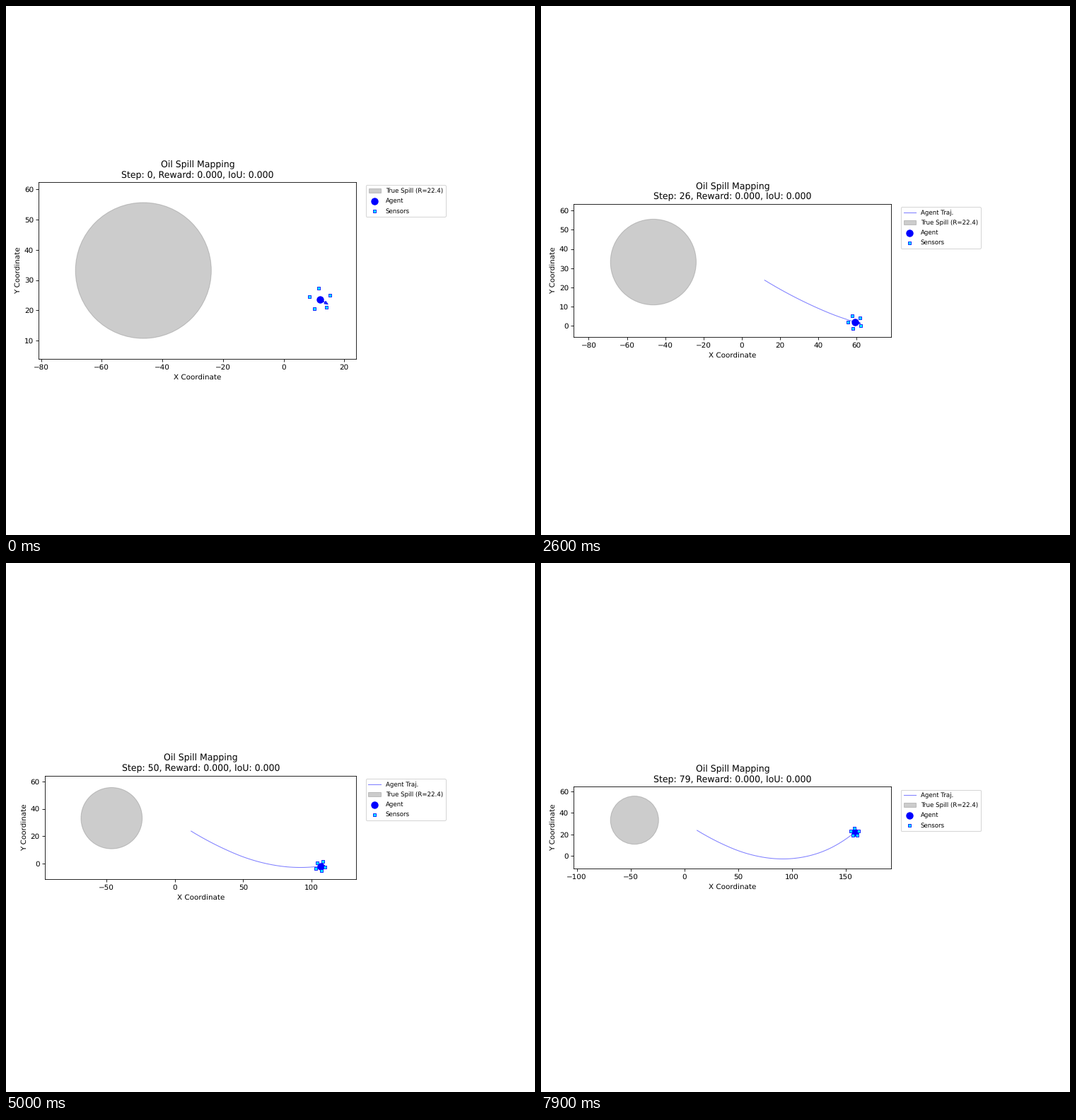
Recreate the animation shown at these times as a matplotlib script. Size 748x748 px, loop 8000 ms.

```python
import numpy as np
import matplotlib.pyplot as plt
from matplotlib.animation import FuncAnimation
from matplotlib.patches import Circle

plt.rcParams["text.hinting"] = "none"

SIZE, DPI = 748, 75
STEPS = 80
SPEED = 2.0
START = np.array([11.9, 23.68])
SPILL, RADIUS = np.array([-46.25, 33.15]), 22.4
SENSOR_DIST = 3.55
RIGHT = 495.4

# The agent moves at constant speed while its heading slowly turns left.
heading = np.radians(np.interp(np.arange(STEPS),
                               [0, 18, 34, 43, 57, 68, 79],
                               [-31.5, -22.9, -9, 0.3, 16, 29, 39.5]))
mid = (heading[:-1] + heading[1:]) / 2
moves = SPEED * np.column_stack([np.cos(mid), np.sin(mid)])
path = START + np.vstack([[0, 0], np.cumsum(moves, axis=0)])

fig = plt.figure(figsize=(SIZE / DPI, SIZE / DPI), dpi=DPI)
ax = fig.add_subplot()


def set_view(step):
    """Frame the spill and the path with a 15 % margin."""
    seen = path[:step + 1]
    low = np.minimum(SPILL - RADIUS, seen.min(axis=0))
    high = np.maximum(SPILL + RADIUS, seen.max(axis=0))
    pad = 0.15 * (high - low)
    ax.set_xlim(low[0] - pad[0], high[0] + pad[0])
    ax.set_ylim(low[1] - pad[1], high[1] + pad[1])
    ax.set_aspect("equal", adjustable="box")
    left = 55.2 if 34 <= step < 68 else 46.4
    ax.set_position([left / SIZE, 0.015, (RIGHT - left) / SIZE, 0.97])


def draw(step):
    ax.clear()
    x, y = path[step]
    angle = heading[step]

    if step > 0:
        ax.plot(*path[:step + 1].T, "b-", lw=1, alpha=0.5, label="Agent Traj.")
    ax.add_patch(Circle(SPILL, RADIUS, color="gray", alpha=0.4,
                        label=f"True Spill (R={RADIUS:.1f})"))
    ax.scatter(x, y, s=100, c="blue", linewidths=0, zorder=5, label="Agent")
    ax.arrow(x, y, SPEED * np.cos(angle), SPEED * np.sin(angle),
             head_width=1.0, head_length=1.2, fc="blue", ec="blue",
             alpha=0.8, zorder=5)

    around = angle + np.radians(-90 + 72 * np.arange(5))
    ax.scatter(x + SENSOR_DIST * np.cos(around),
               y + SENSOR_DIST * np.sin(around),
               s=20, c="cyan", marker="s", edgecolors="blue",
               linewidths=0.8, zorder=6, label="Sensors")

    set_view(step)
    ax.set_xlabel("X Coordinate")
    ax.set_ylabel("Y Coordinate")
    ax.set_title(f"Oil Spill Mapping\nStep: {step}, Reward: 0.000, IoU: 0.000")
    ax.legend(loc="upper left", bbox_to_anchor=(1.02, 1), fontsize="small",
              labelspacing=0.62, borderpad=0.45)


anim = FuncAnimation(fig, draw, frames=STEPS, init_func=lambda: None,
                     interval=100, repeat=True, repeat_delay=0)
plt.show()
```
